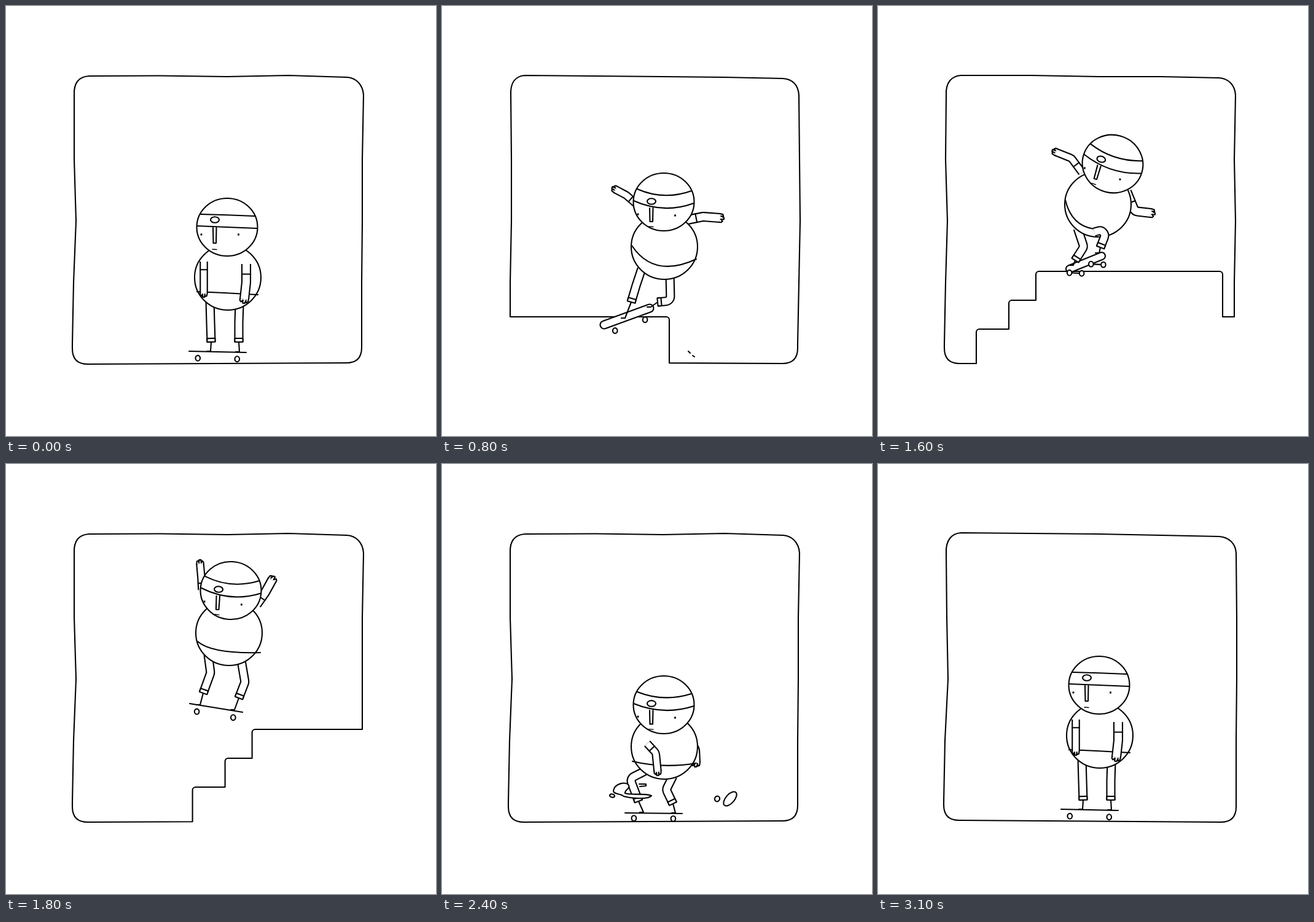
Write an HTML page with a canvas that moves like this. It is 700x700 px and loops after 3.2 s.

```html
<!DOCTYPE html>
<html lang="en">
<head>
<meta charset="utf-8">
<title>Skater</title>
<style>
html, body { margin: 0; width: 100%; height: 100%; overflow: hidden; background: #fff; }
canvas { display: block; width: 100vmin; height: 100vmin; }
</style>
</head>
<body>
<canvas id="stage" width="700" height="700"></canvas>
<script>
const ctx = document.getElementById('stage').getContext('2d');
const STEP = 100, COUNT = 32, INK = '#000', LINE = 2.1, FLOOR = 582;

// head: x, y, tilt, nod · hem: curve · arm: shoulder, elbow, wrist, in front
// leg: hip, knee, ankle, foot, layer (1 in front, 2 with a raised knee)
// board: tail, nose, deck width, wheel drop, half wheelbase, half axle x, y
const poses = {
  stand: {
    head: [360, 360, 0, 0], body: [361, 442], hem: [311, 465, 361, 467, 410, 470],
    armL: [322, 416, 322, 440, 322, 467, 1], armR: [391, 420, 391, 450, 388, 477, 1],
    legL: [332, 480, 333, 515, 334, 547, 333, 562, 0], legR: [380, 485, 379, 515, 379, 547, 380, 563, 0],
    board: [298, 562, 391, 564, 0, 11, 32, 0, 0]
  },
  crouch: {
    head: [361, 392, 0, 9], body: [362, 460], hem: [310, 484, 360, 496, 414, 487],
    armL: [334, 455, 348, 470, 351, 500, 1], armR: [398, 440, 412, 465, 413, 486, 0],
    legL: [330, 500, 306, 512, 320, 549, 328, 567, 0], legR: [376, 508, 365, 530, 376, 553, 380, 568, 0],
    board: [298, 568, 391, 569, 0, 8.5, 32, 0, 0]
  },
  hop: {
    head: [361, 319, 0, 10], body: [362, 392], hem: [309, 390, 345, 444, 414, 412],
    armL: [316, 322, 300, 308, 283, 299, 0], armR: [400, 348, 425, 343, 452, 345, 0],
    legL: [325, 428, 316, 455, 308, 482, 298, 508, 0], legR: [371, 438, 372, 480, 351, 482, 340, 490, 0],
    board: [264, 519, 338, 492, 13, 15, 26, 0, 0]
  },
  flip: {
    head: [363, 241, 0, 9], body: [361, 317], hem: [314, 335, 355, 354, 405, 352],
    armL: [322, 240, 308, 232, 296, 219, 0], armR: [402, 272, 430, 262, 456, 273, 0],
    legL: [312, 341, 315, 356, 318, 373, 318, 383, 2], legR: [378, 362, 382, 398, 363, 418, 347, 436, 0],
    board: [313, 394, 339, 446, 19, 3, 22, 9, -3]
  },
  slide: {
    head: [382, 257, .28, 9], body: [358, 323], hem: [305, 316, 315, 358, 352, 363],
    armL: [332, 271, 315, 248, 290, 238, 0], armR: [405, 302, 418, 334, 444, 337, 0],
    legL: [325, 362, 335, 392, 321, 414, 318, 422, 0], legR: [352, 368, 374, 362, 362, 393, 360, 402, 1],
    board: [312, 428, 364, 407, 12, 11, 19, 10, .5]
  },
  fly: {
    head: [366, 281, .05, 10], body: [363, 350], hem: [312, 364, 335, 384, 414, 382],
    armL: [319, 280, 318, 260, 316, 238, 0], armR: [408, 304, 422, 284, 433, 264, 0],
    legL: [329, 385, 333, 415, 321, 448, 316, 467, 0], legR: [383, 395, 389, 430, 379, 456, 372, 475, 0],
    board: [299, 465, 385, 479, 0, 11, 30, 0, 0]
  }
};

// step, pose, vertical shift
const keys = [
  [0, 'stand', 0], [3, 'stand', 0], [5, 'crouch', 0], [7, 'hop', -25], [8, 'hop', 0],
  [9, 'crouch', -75], [10, 'crouch', -75], [11, 'flip', 0], [12, 'flip', 0], [14, 'crouch', -149],
  [16, 'slide', 0], [17, 'slide', -20], [18, 'fly', -75], [20, 'fly', 0], [22, 'crouch', -4],
  [23, 'crouch', 2], [24, 'crouch', 0], [25, 'crouch', 0], [28, 'stand', 0], [32, 'stand', 0]
];

// wall offsets that make the outline tremble
const outlines = {
  a: { left: [111, 111, 114, 110, 108], top: [114, 113.5, 115, 113, 116], right: [582, 580, 580, 579, 579], base: [583, 581] },
  b: { left: [112, 113, 113, 111, 110], top: [113, 114, 115, 116, 118], right: [581, 582, 583, 581, 579], base: [580, 582] },
  c: { left: [111, 110, 113, 110, 108], top: [113, 113, 115, 115, 117], right: [582, 580, 582, 580, 580], base: [582, 582] },
  d: { left: [111, 112, 114, 109, 107], top: [112, 113, 114, 116, 118], right: [583, 584, 584, 583, 583], base: [580, 583] }
};
const rowsY = [145, 250, 350, 450, 550], colsX = [135, 250, 360, 460, 555];

// ground edges relative to the second step, from right to left, and the level beyond each
const edges = [[308, 506], [0, 432], [-304, 479], [-348, 526], [-401, FLOOR]];

const mix = (a, b, t) => a + (b - a) * t;

function shape(build, fill = true) {
  ctx.beginPath();
  build();
  if (fill) ctx.fill();
  ctx.stroke();
}
const line = (...p) => shape(() => {
  ctx.moveTo(p[0], p[1]);
  for (let i = 2; i < p.length; i += 2) ctx.lineTo(p[i], p[i + 1]);
}, false);
const curve = (x, y, cx, cy, ex, ey) => shape(() => {
  ctx.moveTo(x, y);
  ctx.quadraticCurveTo(cx, cy, ex, ey);
}, false);
const oval = (x, y, rx, ry, turn = 0) => shape(() => ctx.ellipse(x, y, rx, ry, turn, 0, 7));
function dot(x, y) {
  ctx.fillStyle = INK;
  ctx.fillRect(x - 1.4, y - 1.5, 2.8, 3);
  ctx.fillStyle = '#fff';
}
function at(x, y, turn, draw) {
  ctx.save();
  ctx.translate(x, y);
  ctx.rotate(turn);
  draw();
  ctx.restore();
}

function tube([x, y, kx, ky, ex, ey], width, cap = 'butt') {
  ctx.save();
  ctx.lineCap = cap;
  for (const [color, w] of [[INK, width + LINE], ['#fff', width - LINE]]) {
    if (w <= 0) continue;
    ctx.strokeStyle = color;
    ctx.lineWidth = w;
    shape(() => {
      ctx.moveTo(x, y);
      ctx.arcTo(kx, ky, ex, ey, 8);
      ctx.lineTo(ex, ey);
    }, false);
  }
  ctx.restore();
}

function arm(p, width) {
  const [x, y, kx, ky, ex, ey] = p, h = width / 2;
  tube(p, width);
  at(mix(x, kx, .55), mix(y, ky, .55), Math.atan2(ky - y, kx - x), () => line(0, -h, 0, h));
  at(ex, ey, Math.atan2(ey - ky, ex - kx), () =>
    line(0, -h, 5, -h + 1, 6, -h + 4, 2, -h + 4, 7, -1, 7, 2, 2, 2, 5, h - 2, 3, h, 0, h));
}

function leg(p) {
  const [x, y, kx, ky, ex, ey, fx, fy, layer] = p, w = layer > 1.5 ? 17 : 13;
  line(ex, ey, fx, fy, fx - 6, fy);
  if (layer > 1.5) oval(x, y, w / 2, w / 2);
  tube(p, w);
  at(ex, ey, Math.atan2(ey - ky, ex - kx), () => shape(() => ctx.rect(-6, -w / 2, 6, w)));
}

function board([ax, ay, bx, by, width, drop, base, gx, gy]) {
  const wide = gx > 3;
  const wheels = () => at((ax + bx) / 2, (ay + by) / 2, 0, () => {
    const turn = Math.atan2(by - ay, bx - ax), c = Math.cos(turn), s = Math.sin(turn);
    for (const d of [-base, base]) {
      const x = d * c - drop * s * (wide ? .3 : 1), y = d * s + drop * c;
      if (wide) line(x - gx, y - gy, x + gx, y + gy);
      for (const k of wide ? [-1, 1] : [0]) oval(x + gx * k, y + gy * k, 3.8, 4.4);
    }
  });
  if (!wide) wheels();
  tube([ax, ay, (ax + bx) / 2, (ay + by) / 2, bx, by], width, 'round');
  if (wide) wheels();
}

function head([x, y, tilt, nod]) {
  at(x, y, tilt, () => {
    oval(0, 0, 49.5, 47);
    curve(-43, -21, 0, -20 + nod * 1.8, 45, -18);
    curve(-49, -2, 0, nod * 2, 49, 2);
    oval(-20, -12 + nod * 1.1, 7, 4.8);
    const top = 1 + nod * .9, tip = 26 + nod * .6;
    line(-23, top, -22.5, tip, -18, tip, -17.5, top);
    dot(-42, 12 + nod * .8);
    dot(18.5, 12 + nod);
    ctx.lineWidth = 1.4;
    line(-24, 36 + nod * .4, -17, 36.5 + nod * .4);
  });
}

function skater(p) {
  const arms = [[p.armL, 11.5], [p.armR, 14]], legs = [p.legL, p.legR];
  board(p.board);
  for (const [a, w] of arms) if (a[6] < .5) arm(a, w);
  for (const l of legs) if (l[8] < .5) leg(l);
  oval(...p.body, 54, 53);
  curve(...p.hem);
  for (const l of legs) if (l[8] >= .5) leg(l);
  head(p.head);
  for (const [a, w] of arms) if (a[6] >= .5) arm(a, w);
}

function poseAt(n) {
  const i = keys.findIndex(k => k[0] > n), [from, a, ya] = keys[i - 1], [to, b, yb] = keys[i];
  const t = (n - from) / (to - from), pose = {};
  for (const part in poses[a]) pose[part] = poses[a][part].map((v, j) => mix(v, poses[b][part][j], t));
  return { pose, shift: mix(ya, yb, t) };
}

function room(n) {
  const { left, top, right, base } = outlines['adbacb'[n % 6]];
  const scroll = n < 16 ? 62 + 62.4 * (n - 8) : 561 + 71.8 * (n - 16);
  let level = FLOOR;
  const ground = [];
  for (const [offset, next] of edges) {
    const x = scroll + offset;
    if (x > 112 && x < 579) ground.push([x, level], [x, next]);
    if (x > 112) level = next;
  }
  const passed = edges.filter(([offset]) => scroll + offset >= 579);
  const levelR = passed.length ? passed[passed.length - 1][1] : FLOOR;
  const drift = ([x, y]) => [x, y === FLOOR ? mix(base[0], base[1], (x - 110) / 470) : y];
  const wallEnd = (xs, y) => {
    const last = rowsY.filter(r => r < y).length - 1;
    return xs[last];
  };
  const cornerR = drift([wallEnd(right, levelR), levelR]);
  const cornerL = drift([wallEnd(left, level), level]);
  const path = ground.map(drift);
  const inset = (lv, gap) => lv === FLOOR ? Math.max(0, Math.min(25, gap)) : 0;
  const firstX = path.length ? path[0][0] : 300, lastX = path.length ? path[path.length - 1][0] : 300;
  const rR = inset(levelR, cornerR[0] - firstX), rL = inset(level, lastX - cornerL[0]);

  shape(() => {
    ctx.moveTo(left[0], rowsY[0]);
    ctx.bezierCurveTo(left[0] - 1, 124, 120, top[0] + 1, colsX[0], top[0]);
    colsX.forEach((x, i) => ctx.lineTo(x, top[i]));
    ctx.bezierCurveTo(570, top[4] + 1, right[0] - 1, 128, right[0], rowsY[0]);
    rowsY.forEach((y, i) => y < levelR - 10 && ctx.lineTo(right[i], y));
    ctx.lineTo(cornerR[0], cornerR[1] - rR);
    ctx.quadraticCurveTo(...cornerR, cornerR[0] - rR, cornerR[1]);
    path.forEach((p, i) => {
      const mate = path[i ^ 1], next = path[i + 1] || cornerL;
      if (p[1] < mate[1]) ctx.arcTo(...p, ...next, 5);
      else ctx.lineTo(...p);
    });
    ctx.lineTo(cornerL[0] + rL, cornerL[1]);
    ctx.quadraticCurveTo(...cornerL, cornerL[0], cornerL[1] - rL);
    for (let i = 4; i >= 0; i--) if (rowsY[i] < level - 10) ctx.lineTo(left[i], rowsY[i]);
  });
}

function dust(n) {
  if (n === 6) { oval(338, 569, 10, 5, -.5); oval(358, 572, 4, 3); }
  if (n === 7) { oval(374, 566, 6, 3, -.6); oval(388, 571, 3, 2); }
  if (n === 8) { line(401, 562, 404, 565); line(408, 569, 411, 571); }
  const size = { 23: .7, 24: 1, 25: .5 }[n];
  if (!size) return;
  const slide = (n - 24) * 28;
  oval(448 + slide, 545, 4 * size, 4.5 * size, .4);
  oval(469 + slide, 545, 14 * size, 7 * size, -.85);
  at(305, 538, 0, () => {
    ctx.scale(size, size);
    shape(() => {
      ctx.moveTo(-26, -6);
      ctx.bezierCurveTo(-24, -18, -6, -22, -1, -15);
      ctx.bezierCurveTo(2, -9, -8, -8, -7, -2);
      ctx.bezierCurveTo(6, 2, 22, -3, 36, 2);
      ctx.bezierCurveTo(30, 9, 2, 6, -9, 3);
      ctx.bezierCurveTo(-14, -2, -26, 0, -26, -6);
    });
    oval(-28, 2, 4, 2.5, .2);
    line(16, -17, 27, -17, 27, -14, 17, -13);
  });
}

function render() {
  const n = Math.floor(performance.now() / STEP) % COUNT;
  ctx.fillStyle = '#fff';
  ctx.strokeStyle = INK;
  ctx.lineWidth = LINE;
  ctx.lineJoin = ctx.lineCap = 'round';
  ctx.fillRect(0, 0, 700, 700);
  room(n);
  const { pose, shift } = poseAt(n);
  at(0, shift, 0, () => skater(pose));
  dust(n);
  requestAnimationFrame(render);
}
render();
</script>
</body>
</html>
```
